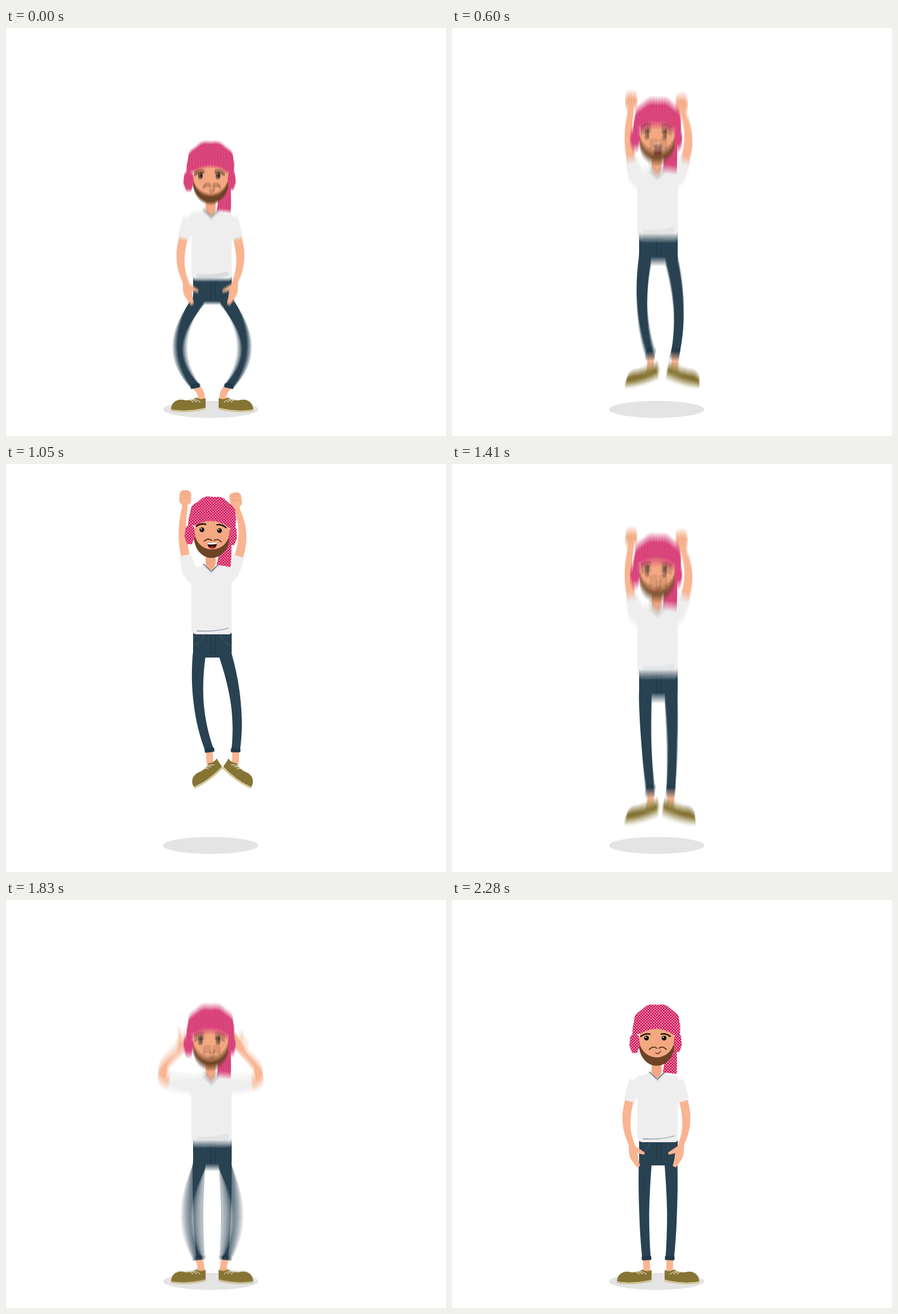
An HTML page with a canvas that plays this animation: 776 px wide and 721 px high, repeating every 2910 ms.

```html
<!DOCTYPE html>
<html lang="en">
<head>
<meta charset="utf-8">
<title>Jumping man</title>
<style>
html, body { margin: 0; width: 100%; height: 100%; overflow: hidden; background: #fff; }
canvas { display: block; }
</style>
</head>
<body>
<canvas id="stage" width="776" height="721"></canvas>
<script>
const W = 776, H = 721, LOOP = 2910, STEP = 30, REST = 2280;
const SHUTTER = 17, SAMPLES = 12;
const TAKEOFF = 180, RISE = 285, FALL = 295, PERIOD = 585, JUMPS = 3;
const CROUCH = 40, APEX = 127;
const SKIN = '#f9b491', FACE = '#f3a882', DENIM = '#284252', SHIRT = '#eeeeee', BEARD = '#6d4426';

const view = document.getElementById('stage').getContext('2d');
const layer = document.createElement('canvas');
layer.width = W;
layer.height = H;
const ctx = layer.getContext('2d');

// Chequered cloth
const tile = document.createElement('canvas');
tile.width = tile.height = 5;
const tileCtx = tile.getContext('2d');
tileCtx.fillStyle = '#d3175c';
tileCtx.fillRect(0, 0, 5, 5);
tileCtx.fillStyle = '#fbeaf0';
for (const p of [0.2, 2.7]) tileCtx.fillRect(p, p, 1.7, 1.7);
const cloth = ctx.createPattern(tile, 'repeat');

// Motion
const clamp = v => Math.max(0, Math.min(1, v));
const smooth = v => { const u = clamp(v); return u * u * (3 - 2 * u); };
const smoother = v => { const u = clamp(v); return u ** 3 * (u * (6 * u - 15) + 10); };
const burst = v => 1 - (1 - clamp(v)) ** 3.6;

const jumpAt = t => Math.floor((t - TAKEOFF) / PERIOD);

// Vertical offset of the body: positive crouches, negative is in the air
function bodyAt(t) {
  const jump = jumpAt(t);
  if (jump < 0) return CROUCH * burst((t + STEP) / (TAKEOFF + STEP));
  if (jump >= JUMPS) return CROUCH * (1 - smooth((t - REST + 240) / 240));
  const local = t - TAKEOFF - jump * PERIOD;
  return CROUCH - (CROUCH + APEX) * (burst(local / RISE) - smoother((local - RISE) / FALL));
}

const raiseAt = t => smooth((t - 165) / 150) - smooth((t - 1710) / 280);

// Drawing helpers
function poly(color, pts) {
  ctx.fillStyle = color;
  ctx.beginPath();
  pts.forEach(([x, y]) => ctx.lineTo(x, y));
  ctx.closePath();
  ctx.fill();
}

function box(color, x, y, w, h, radius) {
  ctx.fillStyle = color;
  ctx.beginPath();
  ctx.roundRect(x, y, w, h, radius);
  ctx.fill();
}

function curve(color, width, x0, y0, cx, cy, x1, y1) {
  ctx.strokeStyle = color;
  ctx.lineWidth = width;
  ctx.lineCap = 'round';
  ctx.beginPath();
  ctx.moveTo(x0, y0);
  ctx.quadraticCurveTo(cx, cy, x1, y1);
  ctx.stroke();
}

// Ellipse with an optional wavy rim
function disc(color, x, y, rx, ry = rx, waves = 0) {
  const pts = Array.from({ length: 72 }, (_, i) => {
    const a = i * Math.PI / 36, r = 1 + (waves ? 0.05 * Math.sin(waves * a) : 0);
    return [x + rx * r * Math.cos(a), y + ry * r * Math.sin(a)];
  });
  poly(color, pts);
}

function group(draw) {
  ctx.save();
  draw();
  ctx.restore();
}

function mirrored(axis, draw) {
  group(() => {
    ctx.translate(2 * axis, 0);
    ctx.scale(-1, 1);
    draw();
  });
}

// Tapered bend through three joints; `end` cuts it short
function limb(color, [a, b, c], [wa, wb, wc], end = 1) {
  const k = [0, 1].map(i => 2 * b[i] - (a[i] + c[i]) / 2);
  const near = [], far = [];
  for (let i = 0; i <= 16; i++) {
    const t = end * i / 16, s = 1 - t;
    const [x, y] = [0, 1].map(j => s * s * a[j] + 2 * s * t * k[j] + t * t * c[j]);
    const [dx, dy] = [0, 1].map(j => s * (k[j] - a[j]) + t * (c[j] - k[j]));
    const w = t < 0.5 ? wa + (wb - wa) * 2 * t : wb + (wc - wb) * (2 * t - 1);
    const n = w / 2 / (Math.hypot(dx, dy) || 1);
    near.push([x - dy * n, y + dx * n]);
    far.unshift([x + dy * n, y - dx * n]);
  }
  poly(color, near.concat(far));
}

// Body parts, drawn for the left side
function shoe() {
  ctx.fillStyle = '#857434';
  ctx.beginPath();
  ctx.moveTo(352, 654);
  ctx.quadraticCurveTo(343, 658, 336, 653);
  ctx.quadraticCurveTo(324, 660, 312, 657);
  ctx.bezierCurveTo(299, 655, 291, 664, 291, 674);
  ctx.quadraticCurveTo(318, 679, 352, 671);
  ctx.fill();
  curve('#cfc596', 3, 292, 676, 320, 680, 351, 673);
  for (const x of [319, 325, 331]) curve('#e8e2c6', 1.2, x, 656, x + 7, 657, x + 11, 661);
}

function leg(body, lift, shift, kick) {
  const rise = Math.min(0, body);
  const squat = 54 * (Math.max(0, body) / CROUCH) ** 0.65;
  const bend = Math.max(squat, 3 - 3 * clamp(lift * 3) + 10 * clamp(kick * 3));
  const hip = [341, 462 + body];
  const foot = [343 + shift, 645 + rise];
  const ankle = [foot[0] - squat * 0.3, 633 + rise];
  const knee = [(hip[0] + ankle[0]) / 2 - bend, (hip[1] + ankle[1]) / 2 + 4];

  limb(SKIN, [ankle, foot, [foot[0] + 1, foot[1] + 12]], [12, 12, 12]);
  group(() => {
    ctx.translate(foot[0], foot[1]);
    ctx.rotate(-0.58 * lift);
    ctx.translate(-343, -645);
    shoe();
  });
  limb(DENIM, [hip, knee, ankle], [23, 17.5, 15]);
  group(() => {
    ctx.translate(ankle[0], ankle[1]);
    ctx.rotate(Math.atan2(knee[0] - ankle[0], ankle[1] - knee[1]) * 0.6);
    box('#20394a', -8.5, -4, 17, 7.5, 2);
  });
}

function hand(isFist) {
  if (!isFist) {
    limb(SKIN, [[0, -2], [0, 20], [5, 41]], [10, 15, 6]);
    limb(SKIN, [[1, 6], [10, 14], [19, 20]], [9, 8, 4]);
    return;
  }
  box(SKIN, -5, -4, 10, 16, 0);
  box(SKIN, -10.5, 6, 21, 26, 8);
  for (const x of [-5, 0, 5]) curve('#dd9474', 0.8, x, 22, x - 0.5, 26, x, 30);
  curve('#dd9474', 0.8, -7, 17, 0, 22, 6, 16);
}

function arm(raise) {
  const rad = Math.PI / 180;
  const upper = (17 + 150 * raise) * rad;
  const fore = (-10 + 193 * smooth(raise * 1.6) + 35 * Math.sin(Math.PI * raise)) * rad;
  const step = (p, angle, d) => [p[0] - Math.sin(angle) * d, p[1] + Math.cos(angle) * d];
  const shoulder = [326, 322];
  const elbow = step(shoulder, upper, 62 - 10 * Math.sin(upper) ** 2);
  const wrist = step(elbow, fore, 52 + 5 * raise);
  const joints = [shoulder, elbow, wrist];

  limb(SKIN, joints, [16, 15, 10]);
  group(() => {
    ctx.translate(wrist[0], wrist[1]);
    ctx.rotate(fore);
    hand(raise > 0.7);
  });
  limb(SHIRT, joints, [28, 12, 12], 0.28);
}

function pants() {
  box(DENIM, 330, 425, 68, 44, [0, 0, 9, 9]);
  for (const x of [361, 369]) curve('#1a303e', 1, x, 430, x, 446, x, 462);
  ctx.setLineDash([2, 2]);
  for (const s of [-1, 1]) curve('#55707f', 0.9, 364 + s * 15, 430, 364 + s * 18, 442, 364 + s * 32, 447);
  ctx.setLineDash([]);
}

function torso() {
  disc(SHIRT, 361, 326, 44, 20);
  box(SHIRT, 327, 310, 71, 118, [0, 0, 5, 9]);
  curve('#8293a4', 1.3, 337, 422, 368, 424, 392, 417);
  limb(FACE, [[361, 284], [361, 303], [362, 319]], [17, 18, 2]);
  for (const s of [-1, 1]) {
    curve('#d9dcdf', 4, 362 + s * 14, 305, 362 + s * 7, 311, 362, 318);
    curve('#50616f', 1.2, 362 + s * 13, 304, 362 + s * 6, 311, 362, 317);
  }
}

function mouth(open) {
  if (!open) {
    curve('#50311c', 1.5, 359, 270, 364, 274, 368, 267);
    return;
  }
  ctx.beginPath();
  ctx.ellipse(362, 266, 8.5, 11, -0.1, 0, Math.PI);
  ctx.clip();
  disc('#2c1212', 362, 266, 12);
  disc('#d3293b', 363, 277, 6, 4);
  curve('#fff', 4, 352, 267, 362, 268, 372, 265);
}

function face(open) {
  disc(BEARD, 361, 255, 31.5, 38);
  disc(FACE, 361, 246, 31, 32);
  const lifted = open ? 3 : 0;
  for (const s of [-1, 1]) {
    const eye = 358.5 + s * 15.5;
    disc('#141414', eye, 244, 4.2);
    disc('#fff', eye - 1.4, 242.4, 1.1);
    curve('#24180f', 2.6, 359 + s * 10, 237 - lifted, 359 + s * 18, 235 - lifted, 359 + s * 26, 241 - lifted);
    curve('#50311c', 1.8, 363 + s * 2, 262, 363 + s * 8, 257, 363 + s * 15, 264);
  }
  group(() => mouth(open));
}

function wrap() {
  disc(cloth, 322, 253, 9, 18, 7);
  disc(cloth, 398, 252, 7, 17, 7);
  ctx.fillStyle = cloth;
  ctx.beginPath();
  for (let a = Math.PI; a <= 2 * Math.PI; a += 0.05) {
    const r = 1 + 0.025 * Math.sin(9 * a);
    ctx.lineTo(361 + 42 * r * Math.cos(a), 223 + 39 * r * Math.sin(a));
  }
  ctx.lineTo(402, 239);
  ctx.lineTo(392, 239);
  ctx.quadraticCurveTo(362, 217, 331, 237);
  ctx.lineTo(318, 237);
  ctx.fill();
}

function head(lift, open) {
  group(() => {
    ctx.translate(361, 300);
    ctx.rotate(0.045 * lift);
    ctx.translate(-361, -300);
    limb(cloth, [[387, 262], [386, 285], [384, 306]], [18, 22, 25]);
    face(open);
    wrap();
  });
}

function drawScene(t) {
  const body = bodyAt(t);
  const raise = raiseAt(t);
  const lift = Math.max(0, -body / APEX);
  const kick = lift ** (1 + Math.max(0, jumpAt(t)));
  const falling = bodyAt(t + 1) > body;
  const open = body < -100 || (falling && body < -30);

  ctx.fillStyle = '#fff';
  ctx.fillRect(0, 0, W, H);
  disc('#e4e4e5', 361, 674, 84, 15);

  leg(body, lift, 16 * lift, kick);
  mirrored(363.5, () => leg(body, lift, -21 * kick, kick));
  group(() => {
    ctx.translate(0, body);
    pants();
    arm(raise);
    mirrored(360.5, () => arm(raise * 0.95));
    torso();
    head(lift, open);
  });
}

// Averages several moments to give motion blur
function render(time) {
  const count = time < REST ? SAMPLES : 1;
  for (let i = 0; i < count; i++) {
    drawScene(time + (count > 1 ? SHUTTER * ((i + 0.5) / count - 0.5) : 0));
    view.globalAlpha = 1 / (i + 1);
    view.drawImage(layer, 0, 0);
  }
}

const start = performance.now();
let shown = -1;
function tick() {
  const elapsed = Math.max(0, performance.now() - start) % LOOP;
  const time = Math.min(REST, Math.floor(elapsed / STEP) * STEP);
  if (time !== shown) render(shown = time);
  requestAnimationFrame(tick);
}
tick();
</script>
</body>
</html>
```
